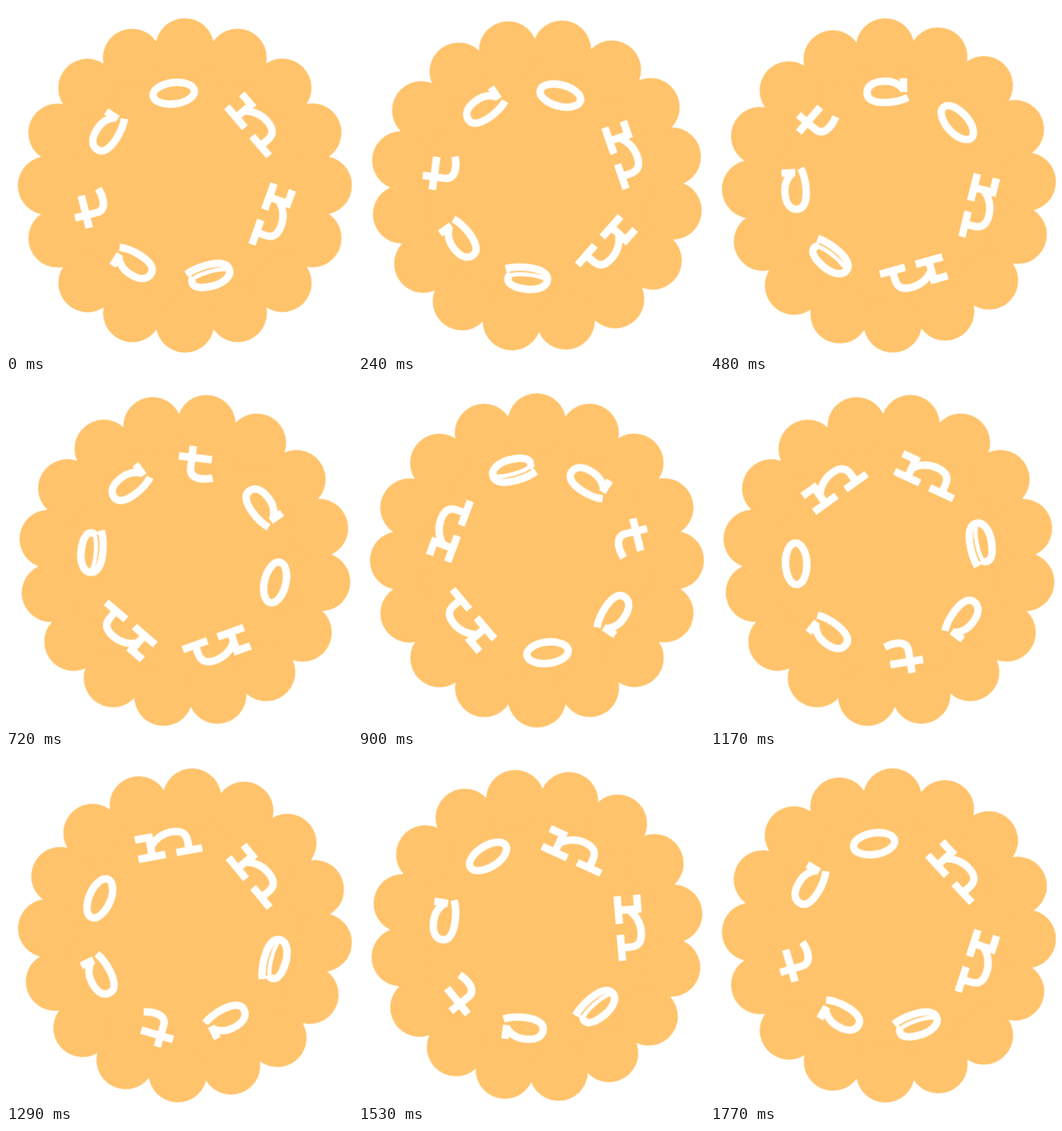
Animation of 438 by 439 pixels, one loop 1.8 s. Source, as an HTML page:

```html
<!DOCTYPE html>
<html lang="en">
<head>
<meta charset="utf-8">
<title>connect</title>
<style>
  html, body { margin: 0; width: 100%; height: 100%; overflow: hidden; background: #fff; }
  svg { display: block; width: 438px; height: 439px; }

  /* sixteen round dots on a ring form the scalloped edge */
  .badge {
    fill: #ffc36b; stroke: #ffc36b; stroke-width: 74;
    stroke-linecap: round; stroke-dasharray: 0 1;
    animation: back 1.8s linear infinite;
  }
  .word {
    fill: none; stroke: #fff; stroke-width: 9.4;
    animation: turn 1.8s cubic-bezier(.65, .24, .35, .76) infinite;
  }
  .thin { stroke-width: 5; }

  @keyframes back { to { transform: rotate(-90deg); } }
  @keyframes turn { to { transform: rotate(360deg); } }
</style>
</head>
<body>
<svg viewBox="0 0 438 439" role="img" aria-label="connect">
  <defs>
    <!-- letters stand on y = 0, centred on x = 0 -->
    <g id="c">
      <path d="M22.5-34.5V-17M22-21C16-28 8-31.5-1-31.5C-16-31.5-24-26-24-17C-24-8-14-4.5 0-4.5C10-4.5 19-6 27.5-10"/>
    </g>
    <g id="o">
      <ellipse cy="-17" rx="26.3" ry="13.5"/>
    </g>
    <g id="n">
      <path d="M-41-29.5H-18M-41-4.7H-6M8-4.7H41M-23-30V-4M-23-17C-16-27-4-31.5 6-31.5C18-31.5 24.5-27 24.5-16V-4"/>
    </g>
    <g id="e">
      <path d="M29-8C20-5 11-4 2-4C-15-4-25-9-25-17.5C-25-26-14-31.5 0-31.5C15-31.5 25-27 25-20.5C25-18 24-16 22-15"/>
      <path class="thin" d="M25-17C14-11.5-12-11.5-24-17"/>
    </g>
    <g id="t">
      <path d="M-23-30H19M-6.5-44.5V-16C-6.5-8-1-4.5 8-4.5C13-4.5 18-5.5 22.5-7"/>
    </g>
  </defs>

  <g transform="translate(226.5 227)">
    <circle class="badge" r="174.5" pathLength="16"/>
    <g class="word">
      <use href="#c" transform="rotate(-56.3) translate(0 -100.5)"/>
      <use href="#o" transform="rotate(-7) translate(0 -100.5)"/>
      <use href="#n" transform="rotate(49.3) translate(0 -100.5)"/>
      <use href="#n" transform="rotate(110) translate(0 -100.5)"/>
      <use href="#e" transform="rotate(164) translate(0 -100.5)"/>
      <use href="#c" transform="rotate(212.5) translate(0 -100.5)"/>
      <use href="#t" transform="rotate(256) translate(0 -100.5)"/>
    </g>
  </g>
</svg>
</body>
</html>
```
